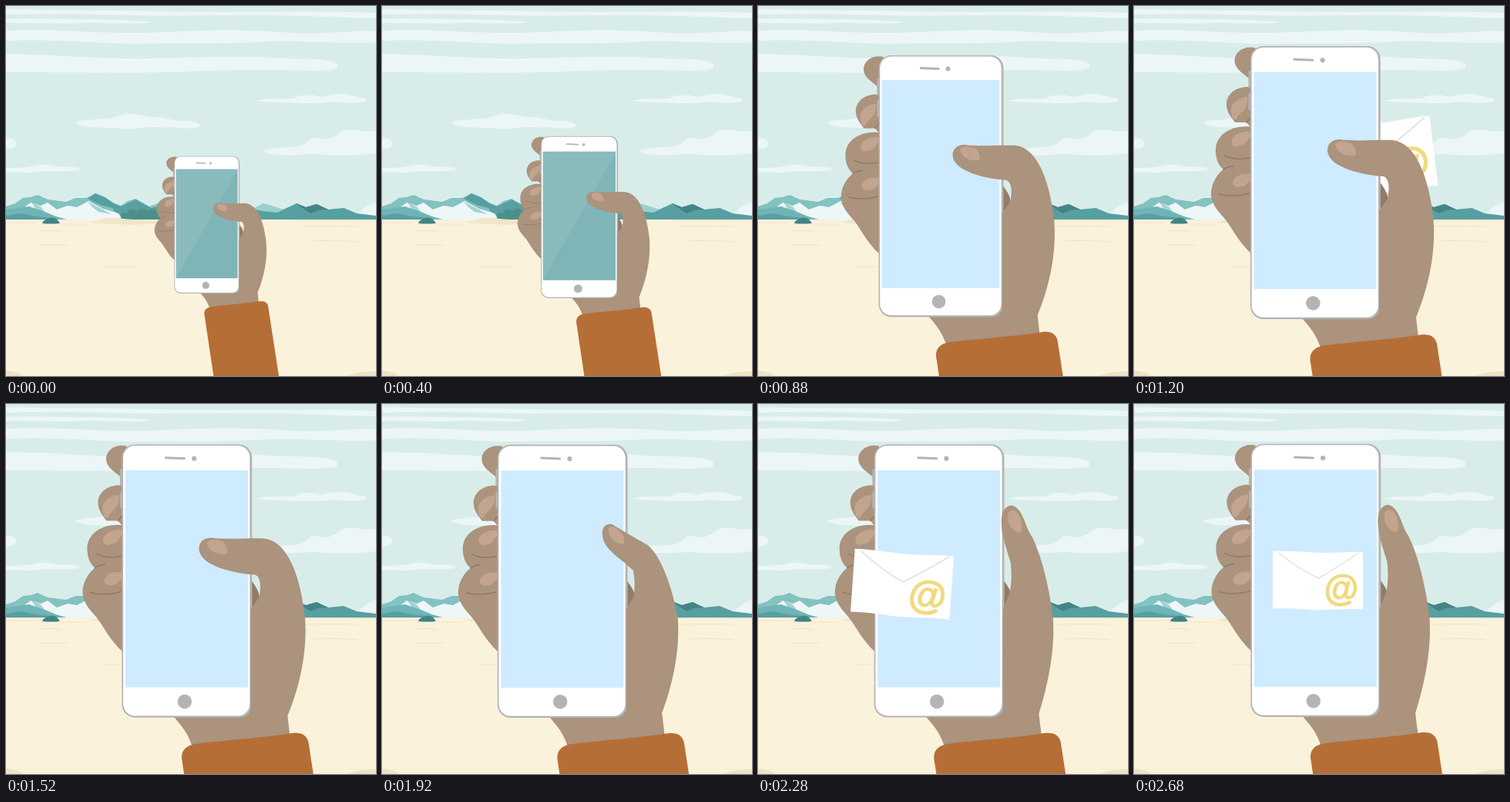
An HTML page that plays this animation: 480 by 480 pixels, repeating every 2.72 s.

```html
<!DOCTYPE html>
<html lang="en">
<head>
<meta charset="utf-8">
<title>Mail arriving on a phone</title>
<style>
  html, body { margin: 0; width: 100%; height: 100%; overflow: hidden; background: #d8edea; }
  svg { display: block; width: 100%; height: 100%; }
  .cloud { fill: #edf6f7; }
  .skin { fill: #ab937d; }
  .nail { fill: #c2a48f; }
  .crease { fill: none; stroke: #927a66; stroke-width: 1.5; stroke-linecap: round; }
  .metal { fill: #b4b4b4; }
  .streak { fill: none; stroke: #f0e5c8; stroke-width: 1.2; stroke-linecap: round; }
</style>
</head>
<body>
<svg viewBox="0 0 480 480">
  <defs>
    <g id="mail">
      <path fill="#fff" d="M-58.5 -38C-35 -39 -15 -36 8 -36C28 -36 42 -38 58.5 -37L58.5 37.5C35 36 10 39 -10 38C-30 36 -44 36 -58.5 36.5Z"/>
      <path fill="none" stroke="#e2e2e2" stroke-width="1.5" d="M-51 -36Q-24 -14 1 -3Q24 -16 53 -36"/>
      <text x="30.5" y="26" text-anchor="middle" font-family="'Liberation Sans', Arial, sans-serif" font-weight="700" font-size="46" fill="#f0da7c" stroke="#f0da7c">@</text>
    </g>
  </defs>

  <g class="cloud">
    <path d="M0 4C60 6 130 5 200 7C300 9 400 5 480 9V16C400 14 340 10 260 12C180 14 90 8 0 11Z"/>
    <path d="M0 17C50 15 70 18 110 17C140 18 165 18 190 21C165 25 130 21 100 22C60 24 30 21 0 22Z"/>
    <path d="M0 32C70 29 110 36 180 35C260 31 310 30 370 35C420 37 450 31 480 33V47C430 49 400 45 340 46C270 50 230 47 170 49C110 48 60 42 0 45Z"/>
    <path d="M0 63C50 62 90 67 150 68C220 69 270 64 330 66C370 70 405 66 426 73C436 79 431 83 405 84C340 83 300 82 240 85C160 88 70 86 0 86Z"/>
    <path d="M90 152C98 147 115 148 128 146C145 146 148 139 162 140C180 140 182 146 199 144C213 146 218 150 230 149C244 149 253 153 251 156C243 161 220 157 200 157C174 156 160 162 140 158C118 158 98 157 90 152Z"/>
    <path d="M325 123C340 119 358 121 374 120C384 113 397 115 410 118C426 112 445 113 458 119C466 119 470 121 467 124C445 127 427 123 405 126C375 126 350 126 325 123Z"/>
    <path d="M333 189C345 182 366 185 383 181C391 179 390 172 402 171C412 174 421 173 429 168C438 158 452 160 463 163L480 162V191C455 194 430 195 405 192C382 191 355 197 333 189Z"/>
    <path d="M0 210C16 210 30 210 42 206C57 205 64 210 78 208C90 209 98 210 97 212C82 216 60 213 42 215C25 217 13 215 0 215Z"/>
    <path d="M0 171C9 171 14 175 13 179C11 184 6 185 0 185Z"/>
    <path d="M452 274C460 264 470 258 480 254V278Z"/>
  </g>

  <path fill="#82c2c1" d="M0 260L12 256 22 249 32 248 41 245 54 251 62 252 78 254 90 249 104 249 116 243 128 248 140 256 149 259 158 253 168 250 186 260 203 254 225 266V278H0Z"/>
  <path fill="#589fa1" d="M106 250L116 243 128 248 140 256 149 260 168 251 188 262 205 258 230 270V278H150L138 262 122 258Z"/>
  <path fill="#eef7f7" d="M20 264L32 255 45 259 54 255 66 264 80 259 92 261 107 253 126 263 146 269 152 278 62 278Z"/>
  <path fill="#a5d3d3" d="M33 255L45 260 51 268 40 265ZM106 254L126 264 136 270 120 267 112 261Z"/>
  <path fill="#70b4b5" d="M0 264L16 262 30 260 48 266 65 273 82 278H0Z"/>
  <path fill="#589fa1" d="M0 272L20 269 38 273 62 275 70 278H0Z"/>
  <path fill="#4c8f8a" d="M149 278V271C151 268 154 268 157 269C159 263 167 263 170 266C173 261 181 263 183 266C188 261 194 264 196 268C203 266 210 270 212 278Z"/>
  <path fill="#9bd0cf" d="M300 278L318 264 334 256 348 260 360 264 376 278Z"/>
  <path fill="#589fa1" d="M290 270L318 263 333 266 352 268 364 262 377 256 389 261 403 257 418 264 438 262 455 269 480 272V278H290Z"/>
  <path fill="#438487" d="M376 256L389 261 403 257 418 264 405 265 395 269 387 264Z"/>
  <rect y="277" width="480" height="203" fill="#faf2db"/>
  <path fill="#f1e6ca" d="M108 281C122 277 130 273 145 275C165 278 188 277 208 281C180 285 142 284 108 281Z"/>
  <path fill="#438487" d="M47 282C49 276 54 277 57 275C63 273 67 277 70 282Q58 283 47 282Z"/>
  <path class="streak" d="M0 281H42M72 283H105M45 292Q60 290 72 293M41 310H80M128 338H170M385 286Q420 285 455 286M398 305Q430 303 456 306M375 278H480"/>
  <path fill="#ece2c6" d="M0 473Q14 474 23 480H0ZM443 480Q458 473 480 474V480Z"/>

  <use id="back" href="#mail"/>

  <g id="hand">
    <path class="skin" d="M157 54C142 51 130.5 60 130.5 71C131 83 144 88 152 97H170Z"/>
    <path class="skin" d="M155 106C138 102 120 111 120 128C120 138 127 145 131 151H146L152 158H165Z"/>
    <path class="nail" d="M148 118C137 117 124 127 126 137C127 146 129 148 133 147C136 139 144 136 146 129C148 124 147 120 148 118Z"/>
    <path class="crease" d="M146 151L151 145"/>
    <path class="skin" d="M155 157C130 153 106 165 106 187C106 199 110 207 116 212C104 222 100 234 100 245C102 262 114 270 121 280C130 294 139 309 151 320L217 404C229 417 237 427 243 446L369 440 365 404 330 262 300 230Z"/>
    <path class="nail" d="M151 163C136 162 125 169 127 179C129 184 134 182 139 181C146 180 146 173 151 171ZM151 218C136 216 127 223 128 231C132 236 137 235 142 234C146 233 147 228 151 227Z"/>
    <path class="crease" d="M118 194Q132 201 150 197M110 244Q130 249 150 243M116 212Q122 208 129 208"/>
    <path fill="#917c69" d="M317 226C326 237 331 246 329 255C327 262 322 264 317 268Z"/>

    <g class="metal">
      <rect x="148.6" y="84" width="4" height="22"/>
      <rect x="148.6" y="113" width="4" height="22"/>
      <rect x="151" y="52" width="168.8" height="354.2" rx="17"/>
    </g>
    <rect x="152.7" y="53.6" width="164.2" height="350.4" rx="15.5" fill="#fff"/>
    <rect id="screen" x="155.5" y="85.6" width="159" height="281.5"/>
    <path id="glare" fill="#fff" d="M155.5 367.1V85.6H314.5V88Z"/>
    <path d="M208 69.3L232 70.3" fill="none" stroke="#b4b4b4" stroke-width="3" stroke-linecap="round"/>
    <circle class="metal" cx="244.7" cy="70.3" r="3.1"/>
    <circle class="metal" cx="232.4" cy="385.5" r="9.2"/>

    <path id="thumb" class="skin"/>
    <path id="thumbNail" class="nail"/>
    <path fill="#b56e36" d="M229.5 465C226 450 233 443 246 440.5C290 435 330 433 372 426.5C385 425 391 430 393 438L424 640H255.5Z"/>
  </g>

  <use id="front" href="#mail"/>
</svg>
<script>
const LOOP = 2720, STEP = 40;
const $ = id => document.getElementById(id);
const back = $('back'), front = $('front'), hand = $('hand');
const display = $('screen'), glare = $('glare'), thumb = $('thumb'), nail = $('thumbNail');

// Thumb across the screen, halfway, and resting at the side.
const thumbs = [
  'M318 266L329 250C332 236 331 224 324 221C300 220 251 210 251 187C251 178 258 173 267 173C290 176 315 173 335 174C369 177 384 232 388.5 276C392 320 382 365 366 404L370 440L318 440Z',
  'M318 266L327 250C330 236 329 226 327 215C310 198 287 188 287 167C287 158 292 154 299 155C316 165 331 174 342 180C362 190 379 240 385 278C388 320 378 365 363 404L369 440L318 440Z',
  'M318 266L326 246C329 238 330 222 328 205C322 185 316 170 316 152C316 138 322 131 330 131C345 136 346 158 356 172C368 196 379 240 383 278C386 320 376 365 364 404L370 440L318 440Z'
];
const nails = [
  'M261 180C263 175 272 174 282 178C288 184 289 190 287 194C276 196 264 192 261 180Z',
  'M295 160C301 156 308 162 314 169C316 175 316 179 314 181C304 180 294 172 295 160Z',
  'M325 141C329 134 337 137 341 148C344 158 343 164 340 167C331 165 322 156 325 141Z'
];
const sway = [[1080, 0, 0], [1920, -1.2, 0.8], [2280, -0.3, 0.4], [2680, 0.4, -0.3]];
const dark = [127, 181, 182], bright = [207, 235, 255];

const lerp = (a, b, u) => a + (b - a) * u;
const span = (t, a, b) => Math.min(1, Math.max(0, (t - a) / (b - a)));
const ease = u => (1 - Math.cos(Math.PI * u)) / 2;

function mixPath(a, b, u) {
  const to = b.match(/[\d.]+/g);
  let i = 0;
  return a.replace(/[\d.]+/g, n => lerp(+n, +to[i++], u).toFixed(2));
}

function pose(list, u) {
  return u < 0.5 ? mixPath(list[0], list[1], u * 2) : mixPath(list[1], list[2], u * 2 - 1);
}

function swayAt(t) {
  let [, x, y] = sway[0];
  for (let i = 1; i < sway.length; i++) {
    const u = ease(span(t, sway[i - 1][0], sway[i][0]));
    x = lerp(x, sway[i][1], u);
    y = lerp(y, sway[i][2], u);
  }
  return [x, y];
}

function place(el, on, x, y, scale, turn) {
  el.style.display = on ? '' : 'none';
  if (on) el.setAttribute('transform', `translate(${x} ${y}) rotate(${turn}) scale(${scale})`);
}

function draw(t) {
  const s = lerp(0.503, 1, ease(span(t, 148, 1048)));
  const [dx, dy] = swayAt(t);
  const x = 235.3 + 51 * (1 - s) + dx, y = 228.7 + 110.5 * (1 - s) + dy;
  hand.setAttribute('transform', `translate(${x} ${y}) scale(${s}) translate(-235.3 -228.7)`);

  const lit = span(t, 490, 880);
  display.setAttribute('fill', `rgb(${dark.map((c, i) => Math.round(lerp(c, bright[i], lit)))})`);
  glare.setAttribute('opacity', 0.08 * (1 - lit));

  const open = ease(span(t, 1640, 2200));
  thumb.setAttribute('d', pose(thumbs, open));
  nail.setAttribute('d', pose(nails, open));

  // The letter flies left behind the phone, then returns in front of it.
  const past = t - 1200;
  place(back, t > 1000 && t < 1540, 318 - past * 1.4, 196 + past * 0.05, 1.22, -7 + past * 0.012);
  const u = span(t, 2000, 2680);
  place(front, t > 2000, lerp(-100, 238.5, 1 - (1 - u) ** 3.55),
    lerp(237.5, 229, u), lerp(1.17, 1, u), lerp(6.8, 0, u));
}

const start = performance.now();
function tick(now) {
  const t = Math.max(0, now - start) % LOOP;
  draw(Math.floor(t / STEP) * STEP);
  requestAnimationFrame(tick);
}
draw(0);
requestAnimationFrame(tick);
</script>
</body>
</html>
```
